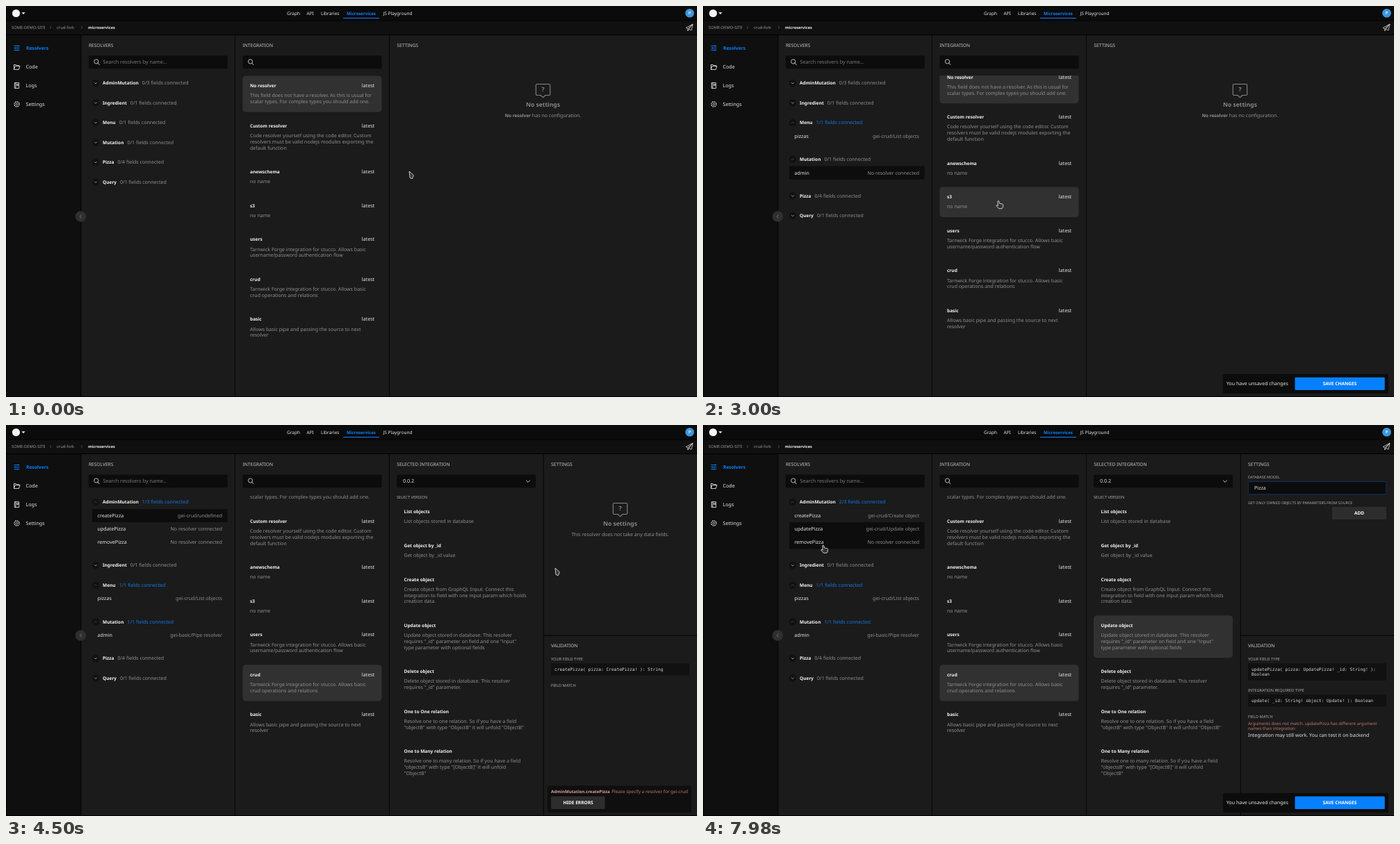
Recreate the animation shown at these times as an HTML page. Size 994 by 563 pixels, loop 8000 ms.

```html
<!DOCTYPE html>
<html lang="en">
<head>
<meta charset="utf-8">
<title>Microservices</title>
<style>
html, body { margin: 0; width: 100%; height: 100%; overflow: hidden; background: #000; }
svg { display: block; width: 100vw; height: 100vh; }
text { font: 7.05px "Noto Sans", sans-serif; fill: #909090; text-rendering: geometricPrecision; }
.w { fill: #e6e6e6; font-size: 7.15px; }
.hint { fill: #7c7c7c; font-size: 7.2px; }
.note { fill: #e6e6e6; font-size: 7.03px; }
.b { fill: #f4f4f4; font-size: 6.55px; font-weight: 700; }
.nav { fill: #e6e6e6; font-size: 6.5px; }
.tab { fill: #0a80ff; font-size: 6.13px; font-weight: 700; }
.side { fill: #0a80ff; font-size: 6.7px; font-weight: 700; }
.crumb { fill: #999; font-size: 5.8px; }
.here { fill: #eee; font-size: 5.66px; font-weight: 700; }
.head { fill: #c6c6c6; font-size: 6.65px; }
.label { fill: #adadad; font-size: 5.65px; }
.field { fill: #adadad; font-size: 5.35px; }
.btn { fill: #fff; font-size: 6.55px; font-weight: 700; }
.big { fill: #858585; font-size: 8.5px; font-weight: 700; }
.gb { font-size: 6.5px; font-weight: 700; }
.on { fill: #1079e6; }
.mono { fill: #d8d8d8; font: 6.2px "DejaVu Sans Mono", monospace; white-space: pre; }
.err { fill: #c27878; font-size: 6.15px; }
.alert { fill: #c27878; font-size: 6.4px; }
.errb { fill: #e0a0a0; font-size: 6.1px; font-weight: 700; }
.load { fill: #2f6fd8; font-size: 5.4px; font-weight: 700; }
</style>
</head>
<body>
<svg id="stage" viewBox="0 0 994 563">
  <defs><clipPath id="list"><rect x="330" y="100" width="221" height="463"/></clipPath></defs>
  <g id="ui"></g>
  <g id="mouse"></g>
</svg>
<script>
const LOOP = 8000;
const ui = document.getElementById('ui'), mouse = document.getElementById('mouse');

const INTEGRATIONS = [
  ['No resolver', 'This field does not have a resolver. As this is usual for', 'scalar types. For complex types you should add one.'],
  ['Custom resolver', 'Code resolver yourself using the code editor. Custom', 'resolvers must be valid nodejs modules exporting the', 'default function'],
  ['anewschema', 'no name'],
  ['s3', 'no name'],
  ['users', 'Tarnwick Forge integration for stucco. Allows basic', 'username/password authentication flow'],
  ['crud', 'Tarnwick Forge integration for stucco. Allows basic', 'crud operations and relations'],
  ['basic', 'Allows basic pipe and passing the source to next', 'resolver']
];
const ITEMS = {
  crud: [
    ['List objects', 'List objects stored in database'],
    ['Get object by _id', 'Get object by _id value'],
    ['Create object', 'Create object from GraphQL Input. Connect this', 'integration to field with one input param which holds', 'creation data.'],
    ['Update object', 'Update object stored in database. This resolver', 'requires "_id" parameter on field and one "input"', 'type parameter with optional fields'],
    ['Delete object', 'Delete object stored in database. This resolver', 'requires "_id" parameter.'],
    ['One to One relation', 'Resolve one to one relation. So if you have a field', '"objectB" with type "ObjectB" it will unfold "ObjectB"'],
    ['One to Many relation', 'Resolve one to many relation. So if you have a field', '"objectsB" with type "[ObjectB]" it will unfold', '"ObjectB"']
  ],
  basic: [['Pipe resolver', 'Pass the source to the next resolver']]
};
const TYPES = [
  ['AdminMutation', 3, ['createPizza', 'updatePizza', 'removePizza']],
  ['Ingredient', 1], ['Menu', 1, ['pizzas']], ['Mutation', 1, ['admin']], ['Pizza', 4], ['Query', 1]
];
const FIELDS = {
  pizzas: {
    parent: 'Menu', typed: 2140, type: ['pizzas: [Pizza!]!'], need: ['objects: [Object!]'],
    err: ['Types does not match. Please change your "Menu.pizzas" field to type', '[Pizza!].']
  },
  admin: { parent: 'Mutation', type: ['admin: AdminMutation'] },
  createPizza: {
    parent: 'AdminMutation', typed: 4960, type: ['createPizza( pizza: CreatePizza! ): String'],
    need: ['create( object: Create! ): String'],
    err: ['Arguments does not match. createPizza has different argument', 'names than integration']
  },
  updatePizza: {
    parent: 'AdminMutation', typed: 7400,
    type: ['updatePizza( pizza: UpdatePizza! _id: String! ):', 'Boolean'],
    need: ['update( _id: String! object: Update! ): Boolean'],
    err: ['Arguments does not match. updatePizza has different argument', 'names than integration']
  }
};

// What each click does
const open = name => s => s.open[name] = true;
const pick = field => s => { s.sel = field; s.focus = false; };
const link = name => s => s.links[s.sel] = { name };
const choose = item => s => s.links[s.sel].item = item;
const focus = s => s.focus = true;
const EVENTS = [
  [500, open('Menu')], [660, pick('pizzas')], [1160, link('crud')], [1580, choose('List objects')], [2000, focus],
  [2700, open('Mutation')], [2840, pick('admin')], [3200, link('basic')], [3680, choose('Pipe resolver')],
  [3840, open('AdminMutation')], [3980, pick('createPizza')], [4200, link('crud')], [4600, choose('Create object')], [4800, focus],
  [5700, pick('updatePizza')], [6140, link('crud')], [6480, choose('Update object')], [7300, focus]
];
const LOADS = [[1180, 1420], [3220, 3580], [4220, 4440]];
const PATH = [
  [100, 580, 238], [380, 131, 118], [480, 133, 166], [640, 160, 187], [880, 330, 298], [1100, 404, 408], [1200, 404, 408],
  [1560, 665, 139], [1740, 665, 139], [1820, 694.5, 92], [2000, 880, 88], [2460, 880, 88],
  [2680, 133, 218], [2820, 170, 240], [2940, 420, 260], [3060, 430, 300], [3180, 450, 425], [3240, 450, 425],
  [3460, 702, 371], [3660, 650, 130], [3820, 133, 108], [3960, 170, 130], [4060, 170, 130],
  [4180, 420, 380], [4240, 420, 380], [4500, 790, 206], [4590, 660, 238], [4640, 660, 238], [4800, 880, 88], [5120, 880, 88],
  [5520, 59, 170], [5680, 165, 148], [5780, 171, 148], [6060, 382, 379], [6160, 382, 379],
  [6480, 670, 308], [6620, 670, 308], [6900, 26, 200], [7280, 880, 88], [7560, 880, 88], [7760, 0, 400], [7960, 173, 173]
];

const ease = p => { p = Math.max(0, Math.min(1, p)); return p * p * (3 - 2 * p); };
function pointer(t) {
  const i = PATH.findIndex(p => p[0] > t);
  if (i === 0) return PATH[0].slice(1);
  if (i < 0) return PATH[PATH.length - 1].slice(1);
  const [t0, x0, y0] = PATH[i - 1], [t1, x1, y1] = PATH[i], k = ease((t - t0) / (t1 - t0));
  return [x0 + (x1 - x0) * k, y0 + (y1 - y0) * k];
}
function stateAt(t) {
  const s = { open: {}, links: {}, sel: null, focus: false };
  for (const [at, act] of EVENTS) if (t >= at) act(s);
  s.loading = LOADS.some(([a, b]) => t >= a && t < b);
  s.scroll = 34 * ease((t - 2960) / 100);
  const start = s.sel && FIELDS[s.sel].typed;
  s.model = start && t >= start ? 'Pizza'.slice(0, Math.floor((t - start) / 40) + 1) : '';
  return s;
}

// Drawing helpers; text y is the middle of the line
const text = (x, y, s, cls = '', anchor = 'start') =>
  `<text x="${x}" y="${(y + 2.3).toFixed(2)}" class="${cls}" text-anchor="${anchor}">${s}</text>`;
const span = (s, cls, dx = 0) => `<tspan class="${cls}" dx="${dx}">${s}</tspan>`;
const rect = (x, y, w, h, fill, rx = 0, more = '') =>
  `<rect x="${x}" y="${y}" width="${w}" height="${h}" fill="${fill}" rx="${rx}" ${more}/>`;
const path = (x, y, d, stroke = '#ddd', width = .9, fill = 'none') =>
  `<path transform="translate(${x} ${y})" d="${d}" stroke="${stroke}" stroke-width="${width}" fill="${fill}" stroke-linejoin="round"/>`;
const circle = (x, y, r, fill, more = '') => `<circle cx="${x}" cy="${y}" r="${r}" fill="${fill}" ${more}/>`;
const DOWN = 'M-2-1l2 2l2-2', UP = 'M-2 1l2-2l2 2', RIGHT = 'M-1-2l2 2l-2 2', LEFT = 'M1-2.5l-2.5 2.5l2.5 2.5';

let px, py, shape;
function hover(x, y, w, h, kind = 'hand') {
  const hit = px >= x && px <= x + w && py >= y && py <= y + h;
  if (hit) shape = kind;
  return hit;
}

function frame() {
  let o = rect(0, 0, 994, 563, '#000') + rect(1, 0, 993, 20.6, '#0b0b0b') + rect(1, 21.4, 993, 19.6, '#101010')
    + rect(1, 42, 106.5, 520, '#0f0f0f')
    + circle(14.5, 10.5, 5.6, '#f4f4f4') + path(25, 10.5, 'M-2.6-1.3h5.2l-2.6 2.7z', 'none', 0, '#fff')
    + text(404, 10.5, 'Graph', 'nav') + text(432.5, 10.5, 'API', 'nav') + text(453, 10.5, 'Libraries', 'nav')
    + text(490, 10.5, 'Microservices', 'tab') + text(542.5, 10.5, 'JS Playground', 'nav') + rect(485, 17, 52, 1, '#0a80ff')
    + circle(983.5, 10.2, 6.3, '#3d97dd') + text(983.5, 10, 'P', 'here', 'middle')
    + text(8, 30.8, 'SOME-DEMO-SITE', 'crumb') + path(64, 31, RIGHT, '#666', .7)
    + text(73, 30.8, 'crud-fork', 'crumb') + path(109, 31, RIGHT, '#666', .7) + text(118, 30.8, 'microservices', 'here')
    + path(983, 31, 'M5-5L-5 .5l2.8 1.2L5-5L-.8 2.3L3 4L5-5M-2.2 1.7V5L-.8 2.3', '#d8d8d8', .8);
  o += path(15.5, 60.5, 'M-4-3h8M-4 0h8M-4 3h8M2-4v2M-2-1v2M1 2v2', '#0a80ff', 1)
    + path(15.5, 88, 'M-4 3.5v-7h3l1 1.3h3.5v1.7M-4 3.5l1.6-5H4.5l-1.5 5z')
    + path(15.5, 114.5, 'M-3.2-4h6.4v8h-6.4zM-1.6-4v8M0-2h2v2h-2z')
    + circle(15.5, 141.5, 3.6, 'none', 'stroke="#ddd" stroke-width="1.2" stroke-dasharray="1.9 .9"')
    + circle(15.5, 141.5, 1.5, 'none', 'stroke="#ddd" stroke-width=".8"');
  o += text(29, 60.5, 'Resolvers', 'side');
  ['Code', 'Logs', 'Settings'].forEach((s, i) => o += text(28.5, 87.5 + 27 * i, s, 'w'));
  return o;
}
const panel = (x, w, title) => rect(x, 42, w, 520, '#1b1b1b') + text(x + 10.5, 56.5, title, 'head');
const search = x => rect(x, 71.5, 200, 18.7, '#0c0c0c', 1.5) + path(x + 10.5, 79.7, 'M2.2 2.2L5.4 5.2', '#ccc', 1)
  + circle(x + 11, 80, 3.1, 'none', 'stroke="#ccc" stroke-width=".9"');

function resolvers(s) {
  let o = panel(108.4, 220.8, 'RESOLVERS') + search(118.8) + text(139.5, 80.7, 'Search resolvers by name...', 'hint'), y = 111;
  for (const [name, total, fields] of TYPES) {
    const opened = s.open[name];
    const used = fields ? fields.filter(f => s.links[f]).length : 0;
    hover(124, y - 8, 194, 16);
    o += circle(129, y, 5.2, '#111') + path(129, y, opened ? UP : DOWN, opened ? '#0d5cab' : '#aaa', .8)
      + text(139, y, span(name, 'b') + span(`${used}/${total} fields connected`, used ? 'on' : '', 5));
    if (opened) {
      fields.forEach((f, i) => {
        const fy = y + 19.5 + 19.2 * i, l = s.links[f];
        if (hover(124, fy - 9.6, 194.5, 19.2) || f === s.sel) o += rect(124, fy - 9.6, 194.5, 19.2, '#0d0d0d', 1);
        o += text(131.5, fy, f, 'w') + text(311, fy, l ? `gei-${l.name}/${l.item}` : 'No resolver connected', '', 'end');
      });
      y += 5 + 19.2 * fields.length;
    }
    y += 28.5;
  }
  return o;
}

function cards(x, top, list, isLit, tag) {
  let o = '';
  for (const [title, ...lines] of list) {
    const h = 34.6 + 8.85 * lines.length;
    const hot = py > 100 && hover(x, top, 200, h);
    if (hot || isLit(title)) o += rect(x, top, 200, h, '#313131', 4.5);
    o += text(x + 10.5, top + 14.5, title, 'b');
    if (tag) o += text(x + 189.7, top + 14.5, tag, 'w', 'end');
    lines.forEach((line, i) => o += text(x + 10.5, top + 28.6 + 8.85 * i, line));
    top += h + 5.2;
  }
  return o;
}

const noSettings = (x, note) =>
  path(x, 120.5, 'M-8.5-8h17q1.7 0 1.7 1.7v12.6q0 1.7-1.7 1.7h-5l-3.5 3.2l-3.5-3.2h-5q-1.7 0-1.7-1.7v-12.6q0-1.7 1.7-1.7z', '#858585', 1.1)
  + text(x, 121, '?', 'big', 'middle') + text(x, 143, 'No settings', 'big', 'middle') + text(x, 158, note, '', 'middle');

function codeBox(y, title, lines) {
  const h = 10.2 + 7.3 * lines.length;
  return [text(784, y, title, 'label') + rect(784, y + 6.3, 199, h, '#111')
    + lines.map((l, i) => text(789, y + 14.8 + 7.3 * i, l, 'mono')).join(''), y + 20.2 + h];
}
function validation(field, chosen) {
  let [o, y] = codeBox(336.8, 'YOUR FIELD TYPE', field.type), part;
  const full = chosen && field.need;
  if (full) { [part, y] = codeBox(y, 'INTEGRATION REQUIRED TYPE', field.need); o += part; }
  o += text(784, y, 'FIELD MATCH', 'label');
  if (full) {
    field.err.forEach((l, i) => o += text(784, y + 9.9 + 7.2 * i, l, 'err'));
    o += text(784, y + 27.6, 'Integration may still work. You can test it on backend', 'note');
  }
  return text(784, 318, 'VALIDATION', 'head') + o;
}

function bar(s, l, needsModel) {
  const error = l && !l.item ? `Please specify a resolver for gei-${l.name}`
    : needsModel && !s.model ? 'Please fill the required field model' : '';
  if (error) {
    return rect(779, 519.5, 207, 38.5, '#0f0f0f', 2)
      + text(784, 528, span(`${FIELDS[s.sel].parent}.${s.sel}`, 'errb') + span(error, 'alert', 2.5))
      + rect(784, 534.8, 77.5, 18.1, '#2d2d2d', 1) + text(823, 544, 'HIDE ERRORS', 'btn', 'middle');
  }
  if (!Object.values(s.links).some(v => v.item)) return '';
  return rect(748, 530, 238, 28, '#0c0c0c', 2) + text(753, 544, 'You have unsaved changes', 'note')
    + rect(851.5, 534.8, 129.2, 18.1, '#0680ff', 1) + text(916, 544, 'SAVE CHANGES', 'btn', 'middle');
}

function details(s) {
  const l = s.links[s.sel];
  if (!l) return panel(551.8, 442.2, 'SETTINGS') + noSettings(772.5, span('No resolver', 'gb') + ' has no configuration.') + bar(s);
  const needsModel = l.name === 'crud' && l.item;
  let o = panel(551.8, 221, 'SELECTED INTEGRATION') + panel(773.6, 220.4, 'SETTINGS') + rect(773, 302.6, 221, 1, '#000');
  if (s.loading) o += text(562, 85, 'SELECT VERSION', 'label');
  else {
    o += rect(562, 71.5, 200, 18.7, '#0c0c0c', 1.5) + text(571, 80.8, '0.0.2', 'w') + path(751, 81, 'M-2.8-1.4l2.8 2.8l2.8-2.8')
      + text(562, 104, 'SELECT VERSION', 'label') + cards(562, 110.5, ITEMS[l.name], t => t === l.item);
  }
  if (needsModel) {
    hover(784, 81.5, 199, 18.5, 'beam');
    o += text(784, 74.8, 'DATABASE MODEL', 'field')
      + rect(784.3, 81.5, 198.4, 18.3, '#0c0c0c', 1, s.focus ? 'stroke="#0a4a94" stroke-width=".6"' : '')
      + text(793, 90.6, s.model, 'w') + text(784, 111.3, 'GET ONLY OWNED OBJECTS BY PARAMETERS FROM SOURCE', 'field')
      + rect(905, 117.7, 78, 18.3, '#2d2d2d', 1) + text(944, 127, 'ADD', 'btn', 'middle');
  } else o += noSettings(883.5, 'This resolver does not take any data fields.');
  return o + validation(FIELDS[s.sel], l.item) + bar(s, l, needsModel);
}

const CURSORS = {
  arrow: path(0, 0, 'M0 0l6.4 5.7l-2 5l-3.4-1.3z', '#d5d5d5', .9, '#3a3a3a'),
  hand: path(0, 0, 'M-1.2.6q1-1.2 1.9 0l1 3.4l3.8.6q1.3.4 1.1 2l-.4 3l-1.2 1.6h-4.6l-3.6-4q0-1.4 1.5-.8l1 .6z', '#ddd', .9, '#333'),
  beam: path(0, 0, 'M-2-5h4M0-5v10M-2 5h4', '#ddd', .9)
};

let last = '';
function draw(t) {
  const s = stateAt(t);
  [px, py] = pointer(t);
  const [mx, my] = [px, py];
  if (s.loading) px = -99;
  shape = 'arrow';
  const l = s.links[s.sel], current = l ? l.name : 'No resolver';
  const lit = name => name === current || (s.loading && name === 'No resolver');
  let o = frame() + resolvers(s) + panel(330, 221, 'INTEGRATION') + search(340.5)
    + `<g clip-path="url(#list)">${cards(340.5, 100.5 - s.scroll, INTEGRATIONS, lit, 'latest')}</g>` + details(s)
    + circle(107.5, 303, 7.8, '#2f2f2f') + path(107.8, 303, LEFT, '#888', .8);
  if (s.loading) {
    o += rect(0, 0, 994, 563, '#000', 0, 'opacity=".64"') + rect(1, 1, 993, 20, '#1b1b1b')
      + text(497, 10.7, 'MICROSERVICES INTEGRATION LOADING', 'load', 'middle');
  }
  if (o !== last) ui.innerHTML = last = o;
  mouse.innerHTML = CURSORS[shape];
  mouse.setAttribute('transform', `translate(${mx} ${my})`);
}

const start = performance.now();
function tick() {
  draw((performance.now() - start) % LOOP);
  requestAnimationFrame(tick);
}
tick();
</script>
</body>
</html>
```
